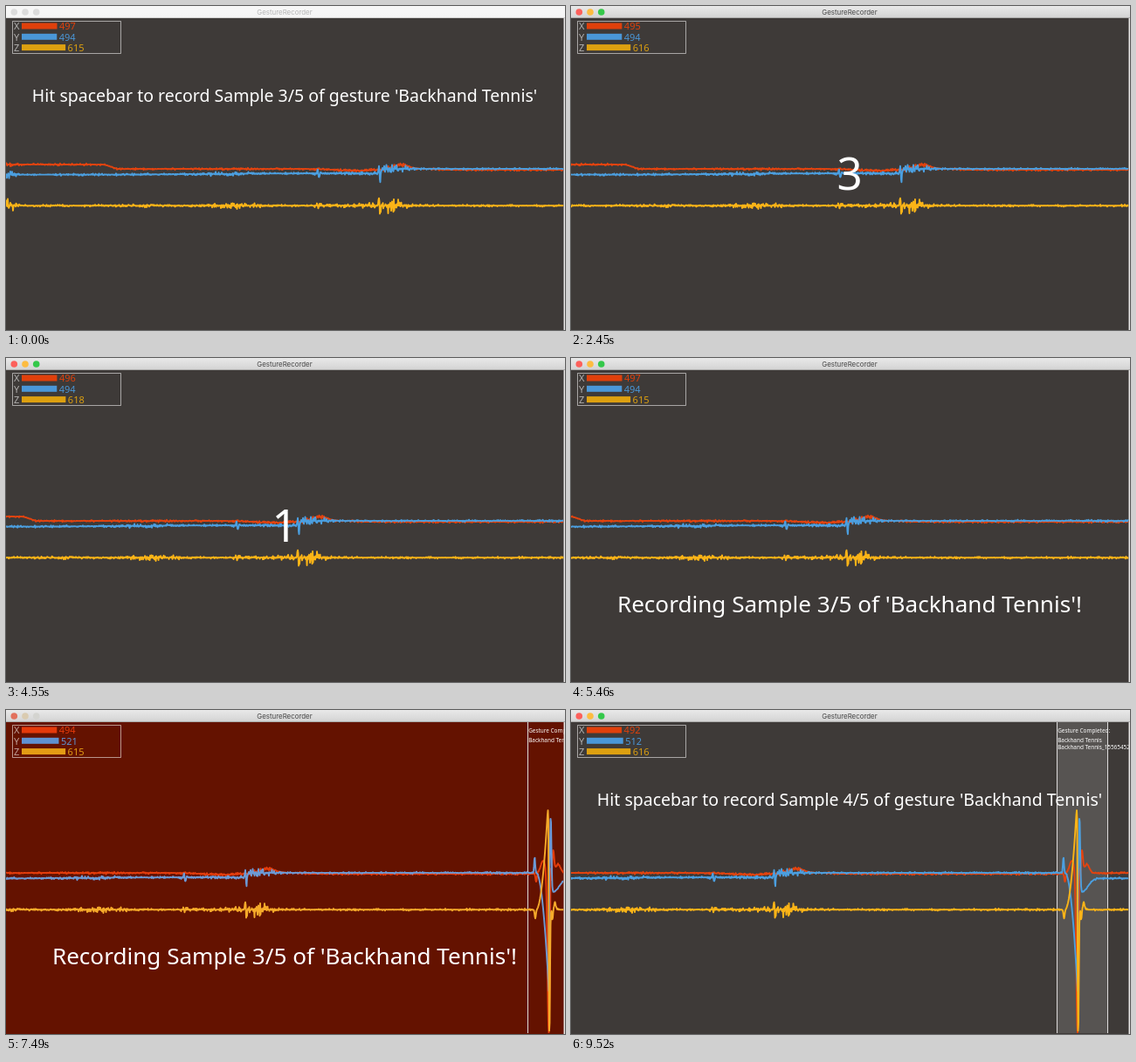
Animation, 640 px wide and 372 px high, one loop 9590 ms. Source, as an HTML page with a canvas:

```html
<!DOCTYPE html>
<html lang="en">
<head>
<meta charset="utf-8">
<title>GestureRecorder</title>
<style>
html, body { margin: 0; width: 100%; height: 100%; overflow: hidden; background: #3e3a38; }
canvas { display: block; width: 100vw; height: 100vh; }
</style>
</head>
<body>
<canvas id="stage" width="640" height="372"></canvas>
<script>
const ctx = document.getElementById('stage').getContext('2d');
const FONT = '"Noto Sans", "Open Sans", sans-serif';
const STEP = 70, STEPS = 137, SPEED = 1.43;
const RIGHT = 638.5, TOP = 14, BOTTOM = 371;
const UNIT = 0.35; // pixels per sensor unit
const GESTURE_START = 750.5, GESTURE_END = 808;
const RECORD_START = 5530, RECORD_END = 8330, ACTIVATED = 1540;

const calm = {
  back: '#3e3a38', region: '#575452', lights: ['#fc605b', '#fdbc40', '#34c84a'],
  lines: ['#e2430f', '#4b9fe0', '#fbb417'], bars: ['#e0400b', '#4a97d8', '#dda010']
};
const inactive = { ...calm, lights: Array(3).fill('#dcdcdc') };
const recordingTheme = {
  back: '#641200', region: '#702c30', lights: ['#e2705c', '#dacbb0', '#d4d4d0'],
  lines: ['#e33c0c', '#6c9ad6', '#f6aa2a'], bars: ['#e53a0b', '#5f92d0', '#e39c14']
};

const ramp = (x, a, b) => Math.min(1, Math.max(0, (x - a) / (b - a)));
const ease = (x, a, b) => { const r = ramp(x, a, b); return r * r * (3 - 2 * r); };
const bump = (x, center, width) => Math.exp(-(((x - center) / width) ** 2));
const kick = (x, at) => bump(x, at + 1.4, 0.8) - bump(x, at, 0.8);

function random(seed) {
  const v = Math.sin(seed * 12.9898) * 43758.5453;
  return (v - Math.floor(v)) * 2 - 1;
}

// Smooth path of each axis: slow drifts first, then the tennis stroke.
const axes = [
  { name: 'X', shake: 0.35, path: x =>
    182 + 5 * ease(x, 110, 130) + 2 * bump(x, 400, 30) - 5 * bump(x, 452, 12)
    + 1.1 * ease(x, 480, 510) - 0.9 * ramp(x, 775, 776)
    + 10 * bump(x, 760, 1) - 15 * bump(x, 768, 4) + 183 * bump(x, 774.4, 2)
    - 65 * bump(x, 776.5, 0.6) - 25 * bump(x, 779.5, 1.5) - 10 * bump(x, 785, 4) },
  { name: 'Y', shake: 0.6, path: x => x < 775
    ? 193.6 - 1.4 * ease(x, 100, 357) - 5.3 * ease(x, 426, 434)
      + 5 * kick(x, 357) + 9 * kick(x, 427)
      - 18 * bump(x, 758.3, 0.9) + 145 * ramp(x, 760, 775) ** 2
    : 193.3 + 15 * bump(x, 780, 9) - 84 * bump(x, 776.7, 1.1) },
  { name: 'Z', shake: 1, path: x =>
    229.2 + 9 * kick(x, 427) + 10 * bump(x, 759, 1)
    - (x < 774.2 ? 127 * ramp(x, 760, 774) ** 2 : 0)
    + 145 * bump(x, 775.2, 0.9) + 12 * bump(x, 778.7, 0.8) - 8 * bump(x, 781.5, 1.5) }
];

// Shaky moments: centre, width, strength.
const tremors = [
  [3, 9, 8], [150, 40, 1.5], [258, 38, 3.5], [358, 5, 4], [395, 30, 2.5], [442, 20, 8]
];

function signal(axis, x, seed) {
  const tremor = tremors.reduce((sum, [c, w, s]) => sum + s * bump(x, c, w), 0);
  const noise = 1.2 * random(seed) ** 5 + axis.shake * tremor * random(seed + 9000) ** 3;
  return Math.min(axis.path(x) + noise, BOTTOM);
}

// One sample every half pixel over the whole recording.
const traces = axes.map((axis, a) =>
  Array.from({ length: 1680 }, (_, i) => signal(axis, i / 2, i + a * 2000)));

function text(str, x, y, size, color = '#fff', align = 'left', family = FONT) {
  ctx.font = `${size}px ${family}`;
  ctx.textAlign = align;
  ctx.fillStyle = color;
  ctx.fillText(str, x, y);
}

function rect(x, y, w, h, color) {
  ctx.fillStyle = color;
  ctx.fillRect(x, y, w, h);
}

function drawTitleBar(theme, active) {
  const shade = ctx.createLinearGradient(0, 0, 0, 13);
  shade.addColorStop(0, active ? '#e9e9e9' : '#f7f7f7');
  shade.addColorStop(1, active ? '#d4d4d4' : '#f5f5f5');
  rect(0, 0, 640, 13, shade);
  rect(0, 13, 640, 1, active ? '#a9a8a7' : '#cfcecd');
  theme.lights.forEach((color, i) => {
    ctx.fillStyle = color;
    ctx.beginPath();
    ctx.arc(9.3 + i * 12.7, 7, 3.8, 0, 7);
    ctx.fill();
  });
  text('GestureRecorder', 319, 10, 7.9, active ? '#444' : '#b4b4b4', 'center',
    'Inter, Roboto, sans-serif');
}

function drawGesture(theme, scroll, complete) {
  const x = Math.round(GESTURE_START - scroll);
  const end = Math.round(GESTURE_END - scroll);
  const height = BOTTOM - TOP;
  if (complete) {
    rect(x, TOP, end - x, height, theme.region);
    rect(end, TOP, 1, height, '#dedcdc');
    text('Backhand Tennis_1556545210', x + 1.2, 45, 6.4);
  }
  rect(x, TOP, 1, height, '#dedcdc');
  text('Gesture Completed:', x + 1.2, 26, 6.4);
  text('Backhand Tennis', x + 1.2, 36.5, 6.4);
}

function drawTraces(theme, scroll) {
  ctx.lineWidth = 1.9;
  ctx.lineJoin = 'round';
  const first = Math.floor(scroll * 2), last = Math.floor((scroll + RIGHT) * 2);
  traces.forEach((trace, a) => {
    ctx.strokeStyle = theme.lines[a];
    ctx.beginPath();
    for (let i = first; i <= last; i++) ctx.lineTo(i / 2 - scroll, trace[i]);
    ctx.stroke();
  });
}

function drawReadout(theme, scroll) {
  ctx.strokeStyle = 'rgba(255,255,255,.55)';
  ctx.lineWidth = 1;
  ctx.strokeRect(7.5, 17.5, 124, 37);
  axes.forEach(({ name }, a) => {
    const y = traces[a][Math.floor((scroll + RIGHT) * 2)];
    const value = Math.round((y - TOP) / UNIT);
    const width = value * 0.0815, row = 19.5 + a * 12.3;
    text(name, 9, row + 7.7, 11, 'rgba(255,255,255,.6)');
    rect(18, row, width, 7, theme.bars[a]);
    text(value, 20.5 + width, row + 7.7, 11, theme.bars[a]);
  });
}

function drawMessage(time) {
  const centered = (str, y, size) => text(str, 319, y, size, '#fff', 'center');
  const prompt = n =>
    centered(`Hit spacebar to record Sample ${n}/5 of gesture 'Backhand Tennis'`, 110, 19.5);
  const countStart = 2100, countStep = 980;
  const count = 3 - Math.floor((time - countStart) / countStep);
  if (time < countStart) prompt(3);
  else if (count > 0) centered(count, 211, 51);
  else if (time < RECORD_END) centered("Recording Sample 3/5 of 'Backhand Tennis'!", 292, 26.1);
  else prompt(4);
}

function draw(step) {
  const time = step * STEP, scroll = step * SPEED;
  const recording = time >= RECORD_START && time <= RECORD_END;
  const active = time >= ACTIVATED;
  const theme = recording ? recordingTheme : active ? calm : inactive;
  rect(0, 0, 640, 372, '#e6e5e4');
  rect(0, TOP, RIGHT, 372 - TOP, theme.back);
  ctx.save();
  ctx.beginPath();
  ctx.rect(0, TOP, RIGHT, BOTTOM - TOP);
  ctx.clip();
  drawGesture(theme, scroll, time >= RECORD_END);
  drawTraces(theme, scroll);
  drawReadout(theme, scroll);
  drawMessage(time);
  ctx.restore();
  drawTitleBar(theme, active);
}

function tick() {
  draw(Math.floor(performance.now() / STEP) % STEPS);
  requestAnimationFrame(tick);
}
tick();
</script>
</body>
</html>
```
